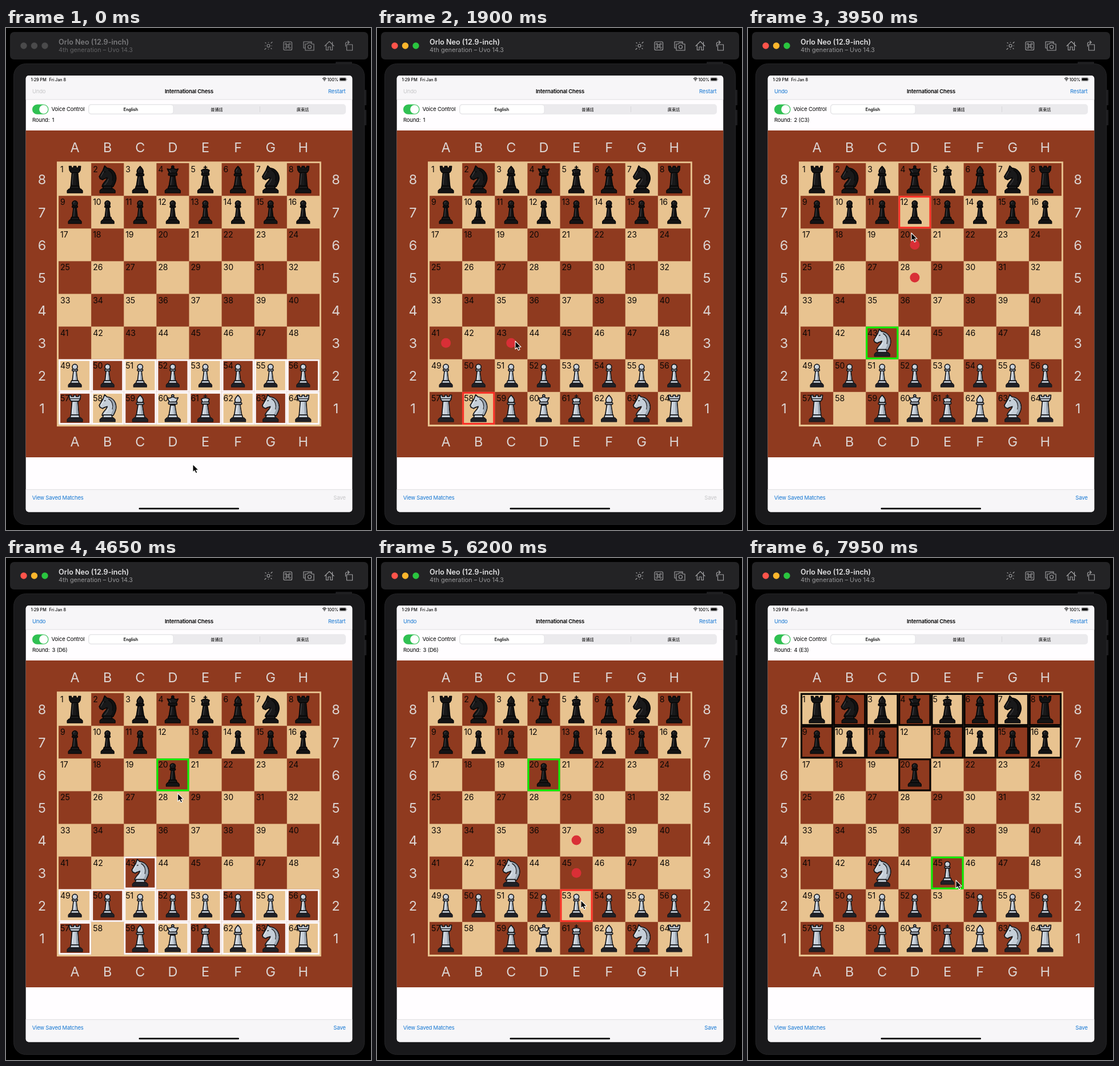
These frames come from a looping animation (639 px wide and 877 px high, 8 s). An HTML page:

```html
<!DOCTYPE html>
<html lang="en">
<head>
<meta charset="utf-8">
<title>International Chess</title>
<style>
  html, body { margin: 0; width: 100%; height: 100%; overflow: hidden; background: #000; }
  svg { display: block; width: 639px; height: 877px; }
  text { font-family: Inter, "Noto Sans CJK TC", "Noto Sans CJK HK", "Noto Sans CJK SC", "Noto Sans CJK", sans-serif; }
  .ui { font-size: 9.48px; letter-spacing: -.19px; }
  .small { font-size: 7.2px; }
  .medium { font-weight: 500; }
  .bold { font-weight: 600; }
  .mid { text-anchor: middle; }
  .end { text-anchor: end; }
  .link { fill: #1577d3; }
  .off { fill: #c6c6c8; }
  .axis { font-size: 23.5px; fill: #dcd5d3; text-anchor: middle; }
  .num { font-size: 14.2px; letter-spacing: -.2px; fill: #0c0806; }
  .white { --body: #c5ced8; --shade: #9ba6b2; --line: #15161a; --shine: #e9eef3; --foot: #202127; }
  .black { --body: #19191a; --shade: #111112; --line: #080808; --shine: #434346; --foot: #141415; }
  .shape { fill: var(--body); stroke: var(--line); stroke-width: 1.7; stroke-linejoin: round; }
  .shade { fill: var(--shade); }
  .foot { fill: var(--foot); stroke: var(--line); stroke-width: 1.2; stroke-linejoin: round; }
  .shine { fill: none; stroke: var(--shine); stroke-width: 1.1; stroke-linecap: round; }
  .mark { fill: none; stroke: var(--line); stroke-width: 1.2; stroke-linecap: round; }
  .icon { fill: none; stroke: #a0a0a2; stroke-width: 1.15; stroke-linejoin: round; stroke-linecap: round; }
  .inactive .icon { stroke: #88888a; }
  .inactive .light { fill: #4a4a4b; }
  .inactive .title { fill: #79797b; }
  .inactive .subtitle { fill: #626264; }
  .title { font-size: 12.6px; font-weight: 600; fill: #e2e2e3; }
  .subtitle { font-size: 10.8px; fill: #98989a; }
</style>
</head>
<body>
<svg viewBox="0 0 639 877">
  <defs>
    <g id="base">
      <path class="shape" d="M20 45L21.500 40H35.500L37 45Z"/>
      <path class="foot" d="M15 52V48L18 45H39L42 48V52Z"/>
    </g>
    <g id="stem">
      <path class="shape" d="M25 21H32L35 40H22Z"/>
      <path class="shade" d="M29.500 22H31.300L34 39H30.500Z"/>
      <path class="shine" d="M26.800 24L25 38"/>
    </g>
    <g id="p">
      <path class="shape" d="M26.300 19H30.700L33 38H24Z"/>
      <path class="shade" d="M29 20H30L32 37H29.500Z"/>
      <path class="shine" d="M27.500 22L26.500 36"/>
      <rect class="shape" x="23.800" y="17.500" width="9.400" height="2.800" rx="1"/>
      <circle class="shape" cx="28.500" cy="13.300" r="4.600"/>
      <path class="shine" d="M26.300 13Q26.400 11 28 10.500"/>
      <path class="shape" d="M21 42L22.500 37.500H34.500L36 42Z"/>
      <path class="foot" d="M17 48.500V45L19.500 42H37.500L40 45V48.500Z"/>
    </g>
    <g id="r">
      <path class="shape" d="M23.500 16H33.500L35.500 40H21.500Z"/>
      <path class="shade" d="M30 17H32.700L34.600 39H31Z"/>
      <path class="shine" d="M25.300 19L23.800 37"/>
      <path class="shape" d="M18.500 5.500H22.200V8.200H26.400V5.500H30.600V8.200H34.800V5.500H38.500L37.800 12.500L35.500 16H21.500L19.200 12.500Z"/>
      <path class="mark" d="M19.500 11.800H37.500"/>
      <use href="#base"/>
    </g>
    <g id="n">
      <path class="shape" d="M23.500 4.800L27.500 8.500C36 9.500 43 16 43.500 26C43.600 33 41 36 38.500 41H19C19.500 34 27 31.500 28 25.500C25 27 22.500 26.500 20 29L15.500 27L14 23.500L20.500 12.500Z"/>
      <path class="shade" d="M29.500 9.700C37 11 42.300 17 42.600 26C42.700 32 40 36 37.800 40H34C37 34 39.500 29 38 22C37 17 34 13 29.500 12Z"/>
      <path class="mark" d="M30.500 12.500C36.500 15.500 39 23 37 30M23 15.500L25 15"/>
      <path class="shine" d="M21.500 15L17 23M30 28Q28.500 33 23.500 38"/>
      <use href="#base"/>
    </g>
    <g id="b">
      <use href="#stem"/>
      <path class="shape" d="M28.500 5.500C31.500 8.500 34.500 12 34 15.500L32.500 18.500H24.500L23 15.500C22.500 12 25.500 8.500 28.500 5.500Z"/>
      <rect class="shape" x="22" y="18.500" width="13" height="3.300" rx="1"/>
      <path class="shine" d="M25.500 14Q25.800 11.500 27.500 10"/>
      <use href="#base"/>
    </g>
    <g id="q">
      <use href="#stem"/>
      <circle class="shape" cx="28.500" cy="6.800" r="2"/>
      <path class="shape" d="M19 10L23 11L28.500 8.500L34 11L38 10L34 18H23Z"/>
      <rect class="shape" x="21" y="17.500" width="15" height="3.800" rx="1"/>
      <path class="shape" d="M23.500 23H33.500"/>
      <path class="shine" d="M23 12.500L25 16"/>
      <use href="#base"/>
    </g>
    <g id="k">
      <use href="#stem"/>
      <path class="mark" style="stroke-width:1.800" d="M28.500 5V11M26 7.300H31"/>
      <path class="shape" d="M21.500 12.500Q28.500 8 35.500 12.500L33.500 18H23.500Z"/>
      <rect class="shape" x="22" y="17.500" width="13" height="3.600" rx="1"/>
      <path class="shine" d="M24 13.500L25.300 16.500"/>
      <use href="#base"/>
    </g>
    <clipPath id="screen"><rect x="34.700" y="83.300" width="571.500" height="762.200" rx="5"/></clipPath>
  </defs>

  <rect width="639" height="877"/>
  <g id="window">
    <rect x="7" y="7" width="627" height="48" rx="7" fill="#232325"/>
    <circle class="light" cx="31" cy="31" r="5.700" fill="#ff544b"/>
    <circle class="light" cx="49.500" cy="31" r="5.700" fill="#fdb62c"/>
    <circle class="light" cx="68" cy="31" r="5.700" fill="#2ac53f"/>
    <text class="title" x="92" y="29">Orlo Neo (12.9-inch)</text>
    <text class="subtitle" x="92" y="42.300">4th generation – Uvo 14.3</text>
    <g class="icon">
      <circle cx="459.500" cy="31" r="2.500"/>
      <path d="M459.500 25V25.500M459.500 36.500V37M453.500 31H454M465 31H465.500M454 25.500L455 26.500M464 35.500L465 36.500M466 24.500L464 26.500M453 37.500L455 35.500"/>
      <rect x="486" y="24" width="14.500" height="14.500" rx="2"/>
      <path stroke-width="1" d="M491.500 29.500H495V33H491.500ZM491.500 29.500H490A1.500 1.500 0 1 1 491.500 28ZM495 29.500V28A1.500 1.500 0 1 1 496.500 29.500ZM495 33H496.500A1.500 1.500 0 1 1 495 34.500ZM491.500 33V34.500A1.500 1.500 0 1 1 490 33Z"/>
      <path d="M523 35H521V24H535V26M524 28H527.500L529 26H534L535.500 28H539V39H524Z"/>
      <circle cx="531.500" cy="33" r="3"/>
      <path d="M558 31.500L566 23.500L574 31.500M560.500 30V38.500H564V33H568V38.500H571.500V30M571.500 28V24.500"/>
      <path d="M596.500 29H606.500V39H596.500ZM594.500 32V27Q594.500 25 596.500 25H601M598.500 22.500L601 25L598.500 27.500"/>
    </g>
  </g>

  <g fill="#1d1d1f">
    <rect x="577" y="59" width="29" height="4" rx="1"/>
    <rect x="627" y="108" width="4" height="27" rx="1"/>
    <rect x="627" y="143" width="4" height="27" rx="1"/>
    <rect x="13.500" y="62.500" width="614" height="805" rx="21" fill="#19191b" stroke="#242426"/>
  </g>
  <g clip-path="url(#screen)">
    <rect x="34" y="83" width="573" height="763" fill="#fffdff"/>
    <path d="M34 83H607V125H34ZM34 806H607V846H34Z" fill="#f7f6f8"/>
    <path d="M34 125H607M34 806.300H607" stroke="#d4d3d6" stroke-width=".7"/>
    <rect x="34" y="179" width="573" height="571" fill="#8f3a1f"/>
  </g>

  <text class="small medium" x="43.500" y="92.500">1:29 PM</text>
  <text class="small medium" x="75.500" y="92.500">Fri Jan 8</text>
  <path d="M554 88.800Q557.500 85.500 561 88.800M555.500 90.500Q557.500 88.800 559.500 90.500" fill="none" stroke="#000" stroke-width="1.100"/>
  <circle cx="557.500" cy="92" r=".8"/>
  <text class="small medium end" x="582" y="92.500">100%</text>
  <rect x="583.700" y="86.700" width="12" height="6" rx="1.600" fill="none" stroke="#777" stroke-width=".6"/>
  <rect x="584.600" y="87.600" width="10.200" height="4.200" rx=".9"/>
  <rect x="596.300" y="88.700" width=".8" height="2" fill="#777"/>

  <text id="undo" class="ui" x="46" y="114.300">Undo</text>
  <text class="ui bold mid" x="320.500" y="114.300">International Chess</text>
  <text class="ui link end" x="594.500" y="114.300">Restart</text>
  <rect x="46" y="133.500" width="28.500" height="17.300" rx="8.650" fill="#30c052"/>
  <circle cx="65.800" cy="142.100" r="7.600" fill="#fff"/>
  <text class="ui" x="79.500" y="145.400">Voice Control</text>
  <rect x="144" y="133" width="451" height="18" rx="5" fill="#ebeaed"/>
  <rect x="145" y="134" width="148" height="16" rx="4" fill="#fff" stroke="#dcdbde" stroke-width=".7"/>
  <path d="M444.500 137V147" stroke="#cfced2" stroke-width=".7"/>
  <text class="small bold mid" x="218.500" y="144.600">English</text>
  <text class="small medium mid" x="369" y="144.700">普通話</text>
  <text class="small medium mid" x="519.500" y="144.700">廣東話</text>
  <text class="ui" x="46" y="163.600">Round:</text>
  <text id="round" class="ui" x="80.500" y="163.600"></text>

  <rect x="89" y="233.300" width="462.800" height="462.800" fill="#e8c390"/>
  <g id="grid"></g>
  <g id="play"></g>

  <text class="ui link" x="45.700" y="823.800">View Saved Matches</text>
  <text id="save" class="ui end" x="594.500" y="823.800">Save</text>
  <rect x="232.500" y="838.300" width="175.500" height="2.800" rx="1.400"/>
  <path id="cursor" d="M0 0V14L3.200 11.200L5.400 16L8 14.800L5.800 10.200H10Z" stroke="#fff" stroke-width="1.100" stroke-linejoin="round"/>
</svg>
<script>
const LOOP = 8000, CELL = 57.1, LEFT = 92.1, TOP = 236.1;
const $ = id => document.getElementById(id);
const cellX = i => LEFT + i % 8 * CELL;
const cellY = i => TOP + Math.floor(i / 8) * CELL;

const phases = [
  { at: 0, turn: 'white', inactive: true },
  { at: 1000, turn: 'white' },
  { at: 1300, picked: 57, dots: [40, 42] },
  { at: 2100, move: [57, 42], round: '2 (C3)', turn: 'black' },
  { at: 3350, picked: 11, dots: [19, 27] },
  { at: 4250, move: [11, 19], round: '3 (D6)', turn: 'white' },
  { at: 5550, picked: 52, dots: [36, 44] },
  { at: 7300, move: [52, 44], round: '4 (E3)', turn: 'black' }
];

// time, x, y of the pointer tip
const pointer = [
  [0, 327, 762], [350, 327, 762], [950, 183, 668], [1400, 183, 668],
  [1900, 242, 547], [2200, 242, 549], [2950, 267, 277], [3250, 291, 318],
  [3500, 290, 321], [3950, 286, 358], [4200, 290, 376], [4450, 290, 378],
  [5250, 358, 588], [5600, 357, 598], [6300, 357, 598], [7050, 363, 561], [8000, 364, 563]
];

function drawGrid() {
  let out = '';
  for (let i = 0; i < 64; i++) {
    const x = cellX(i), y = cellY(i);
    if ((i + (i >> 3)) % 2) out += `<rect x="${x}" y="${y}" width="${CELL}" height="${CELL}" fill="#8f3a1f"/>`;
    out += `<text class="num" x="${x + 3}" y="${y + 16}">${i + 1}</text>`;
  }
  for (let k = 0; k < 8; k++) {
    const x = LEFT + (k + .5) * CELL, y = TOP + (k + .5) * CELL + 8.8;
    for (const ty of [216.7, 730.8]) out += `<text class="axis" x="${x}" y="${ty}">${'ABCDEFGH'[k]}</text>`;
    for (const tx of [63, 577.5]) out += `<text class="axis" x="${tx}" y="${y}">${8 - k}</text>`;
  }
  $('grid').innerHTML = out;
}

function boardAt(phase) {
  const board = [...'rnbqkbnrpppppppp' + '.'.repeat(32) + 'PPPPPPPPRNBQKBNR'];
  let last = null, round = '1';
  for (const step of phases.slice(0, phase + 1)) if (step.move) {
    const [from, to] = step.move;
    board[to] = board[from];
    board[from] = '.';
    last = to;
    round = step.round;
  }
  return { board, last, round };
}

const ring = (i, color) =>
  `<rect x="${cellX(i) + 1.5}" y="${cellY(i) + 1.5}" width="${CELL - 3}" height="${CELL - 3}" fill="none" stroke="${color}" stroke-width="3"/>`;

function drawPhase(index) {
  const { turn, inactive, picked, dots = [] } = phases[index];
  const { board, last, round } = boardAt(index);
  let rings = '', pieces = '';
  board.forEach((piece, i) => {
    if (piece === '.') return;
    const side = piece < 'a' ? 'white' : 'black';
    if (side === turn) rings += ring(i, side === 'white' ? '#fcf8fa' : '#050403');
    pieces += `<use href="#${piece.toLowerCase()}" class="${side}" x="${cellX(i)}" y="${cellY(i)}"/>`;
  });
  if (last !== null) rings += ring(last, '#08f505');
  if (picked !== undefined) rings += ring(picked, '#fb2d25');
  const spots = dots.map(i => `<circle cx="${cellX(i) + CELL / 2}" cy="${cellY(i) + CELL / 2}" r="8.5" fill="#d92f36"/>`);
  $('play').innerHTML = pieces + rings + spots.join('');
  $('window').setAttribute('class', inactive ? 'inactive' : '');
  $('round').textContent = round;
  const state = last === null ? 'off' : 'link';
  $('undo').setAttribute('class', 'ui ' + state);
  $('save').setAttribute('class', 'ui end ' + state);
}

function drawPointer(t) {
  const k = pointer.findIndex(p => p[0] > t);
  const [t0, x0, y0] = pointer[k - 1], [t1, x1, y1] = pointer[k];
  const u = (t - t0) / (t1 - t0), e = u * u * (3 - 2 * u);
  $('cursor').setAttribute('transform', `translate(${x0 + (x1 - x0) * e} ${y0 + (y1 - y0) * e})`);
}

let shown = -1;
const start = performance.now();
function frame() {
  const t = (performance.now() - start) % LOOP;
  const index = phases.filter(p => p.at <= t).length - 1;
  if (index !== shown) drawPhase(shown = index);
  drawPointer(t);
  requestAnimationFrame(frame);
}
drawGrid();
frame();
</script>
</body>
</html>
```
